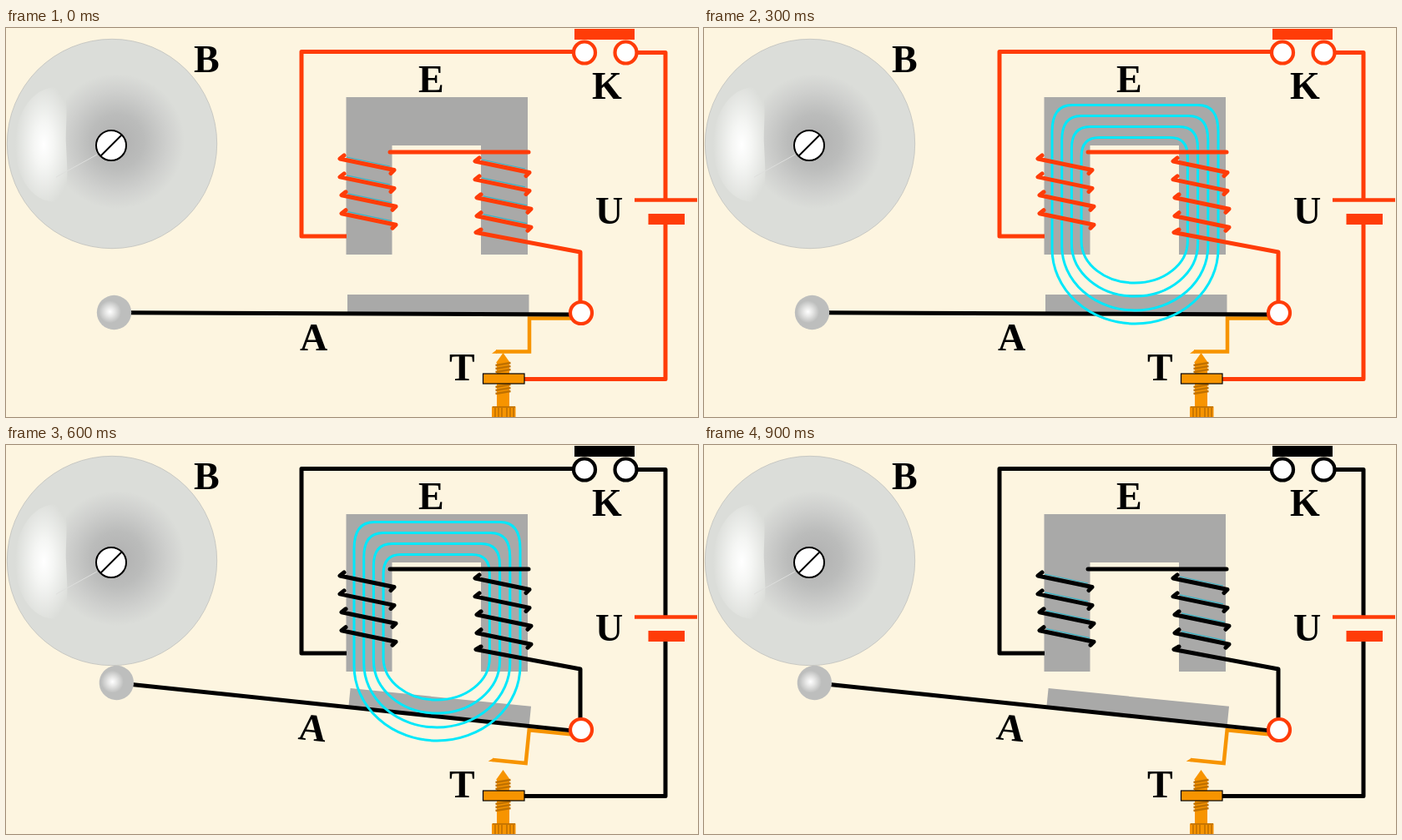
An HTML page that plays this animation: 829 by 467 pixels, repeating every 1.2 s.

```html
<!DOCTYPE html>
<html lang="en">
<head>
<meta charset="utf-8">
<title>Electric bell</title>
<style>
  html, body { margin: 0; width: 100%; height: 100%; overflow: hidden; background: #fdf5e0; }
  svg { display: block; width: 829px; height: 467px; --live: #ff3c08; --wire: var(--live); }
  text { font: bold 46px "Liberation Serif", "Times New Roman", serif; }
  path, line { fill: none; }
  .wire { stroke: var(--wire); stroke-width: 5; stroke-linejoin: round; }
  .ring { fill: #fff; stroke-width: 4.2; }
  .iron { fill: #a9a9a8; }
  .brass { fill: #f79400; }
  .thread { stroke: #c07100; stroke-width: 2.4; }
</style>
</head>
<body>
<svg viewBox="0 0 829 467">
  <defs>
    <radialGradient id="dome">
      <stop offset="0" stop-color="#b0b0b0"/>
      <stop offset=".4" stop-color="#bbbcbb"/>
      <stop offset=".75" stop-color="#cfd0ce"/>
      <stop offset="1" stop-color="#dbddd9"/>
    </radialGradient>
    <radialGradient id="shine" cx=".55" cy=".5" r=".55">
      <stop offset="0" stop-color="#fff"/>
      <stop offset=".35" stop-color="#f5f6f4"/>
      <stop offset="1" stop-color="#dbddd9"/>
    </radialGradient>
    <radialGradient id="ball" cx=".38" cy=".48" r=".5">
      <stop offset="0" stop-color="#fff"/>
      <stop offset=".25" stop-color="#e8e8e7"/>
      <stop offset=".65" stop-color="#bdbebd"/>
    </radialGradient>
  </defs>

  <!-- bell -->
  <circle cx="127" cy="139" r="125.7" fill="#dbddd9" stroke="#bfc1bd" stroke-width=".8"/>
  <circle cx="133" cy="136" r="81" fill="url(#dome)"/>
  <path d="M68 73C40 64 11 95 11 140S38 216 68 207C76 190 73 165 72 140S76 90 68 73Z" style="fill:url(#shine)"/>
  <path d="M60 179L109 152" stroke="#dedfdd"/>
  <circle cx="126" cy="141" r="18" fill="#fff" stroke="#000" stroke-width="2"/>
  <path d="M113 154L139 128" stroke="#000" stroke-width="2"/>

  <path d="M407.500 83H625V272H569V141H462.500V272H407.500Z" style="fill:#a9a9a8"/>

  <!-- contact screw -->
  <g class="brass">
    <path d="M595.500 390L604 402H587Z" style="fill:#f79400"/>
    <rect x="588" y="401" width="15" height="55"/>
    <rect x="582" y="454.500" width="28.500" height="13"/>
  </g>
  <path id="thread" class="thread"/>
  <path d="M583 455H610M586 456V467M590 456V467M594 456V467M600 456V467M604 456V467M608 456V467" stroke="#b96c00" stroke-width="1.400"/>

  <g id="arm">
    <rect class="iron" x="409" y="320" width="217.500" height="23"/>
    <path d="M682 348.500H627V388.500H587" stroke="#f79400" stroke-width="4.500"/>
    <path d="M582 390.700L588 386.200V390.700Z" style="fill:#f79400"/>
    <path d="M148 341.700L678 344" stroke="#000" stroke-width="5"/>
    <circle cx="129.500" cy="341.500" r="20.700" fill="url(#ball)"/>
    <text x="352" y="387">A</text>
  </g>

  <path id="flux" stroke="#00e8fa" stroke-width="3"/>
  <path id="edge" stroke="#38b4c6" stroke-width="1.200"/>

  <!-- circuit -->
  <g class="wire">
    <path d="M682 28.500H354V250H408M757 29.500H790V206M790 236V421.500H621"/>
    <path d="M460 149H626" stroke-linecap="round"/>
    <path d="M569 242L563 245.500L688 269V330" stroke-linecap="round"/>
    <path id="coils" stroke-linecap="round"/>
    <circle class="ring" cx="693" cy="29.500" r="13"/>
    <circle class="ring" cx="742.500" cy="29.500" r="13"/>
  </g>
  <rect x="681" y="1" width="72" height="13" fill="var(--wire)"/>
  <path d="M753 206.500H828" stroke="var(--live)" stroke-width="4.500"/>
  <rect x="769.500" y="223" width="43.500" height="13" fill="var(--live)"/>
  <circle class="ring" cx="689" cy="342" r="13" stroke="var(--live)"/>
  <rect class="brass" x="571.500" y="415" width="49.500" height="12" stroke="#000" stroke-width="1.200"/>

  <text x="225" y="53">B</text>
  <text x="494" y="77">E</text>
  <text x="702" y="85">K</text>
  <text x="706" y="235">U</text>
  <text x="531" y="423">T</text>
</svg>
<script>
  const $ = id => document.getElementById(id);
  const svg = document.querySelector("svg");

  // Field lines: four nested loops through core and armature
  let d = "";
  for (let i = 0; i < 4; i++) {
    const l = 417 + 11.7 * i, r = 616 - 12.2 * i, t = 92.5 + 13 * i;
    const b = [355, 339, 322, 306][i], y = 265 - 3 * i, c = 24 - i, h = 32 - 3 * i;
    d += `M${l} ${y}V${t + h}Q${l} ${t} ${l + c} ${t}H${r - c}Q${r} ${t} ${r} ${t + h}` +
         `V${y}A${(r - l) / 2} ${b - y} 0 0 1 ${l} ${y}Z`;
  }
  $("flux").setAttribute("d", d);

  // Windings: slanted turns with a short hook at each end
  let turns = "", edges = "";
  for (const [x0, y0] of [[400, 157], [562, 160]])
    for (let i = 0; i < 4; i++) {
      const x = x0 + (i > 1 ? 2 : 0), y = y0 + 21.9 * i;
      turns += `M${x + 5} ${y - 4}L${x} ${y}L${x + 65} ${y + 13.5}L${x + 61} ${y + 17.5}`;
      edges += `M${x + 8} ${y - 2}L${x + 60} ${y + 9}`;
    }
  $("coils").setAttribute("d", turns);
  $("edge").setAttribute("d", edges);

  let grooves = "";
  for (const y of [405, 409, 413, 431, 435, 439]) grooves += `M586.5 ${y}L604.5 ${y - 3}`;
  $("thread").setAttribute("d", grooves);

  function draw() {
    const step = Math.floor(performance.now() / 300) % 4;
    const open = step > 1;
    svg.style.setProperty("--wire", open ? "#000" : "var(--live)");
    $("arm").setAttribute("transform", `rotate(${open ? 5.75 : 0} 689 342)`);
    $("flux").style.display = step === 1 || step === 2 ? "" : "none";
    $("edge").style.display = step === 0 || step === 3 ? "" : "none";
    requestAnimationFrame(draw);
  }
  draw();
</script>
</body>
</html>
```
